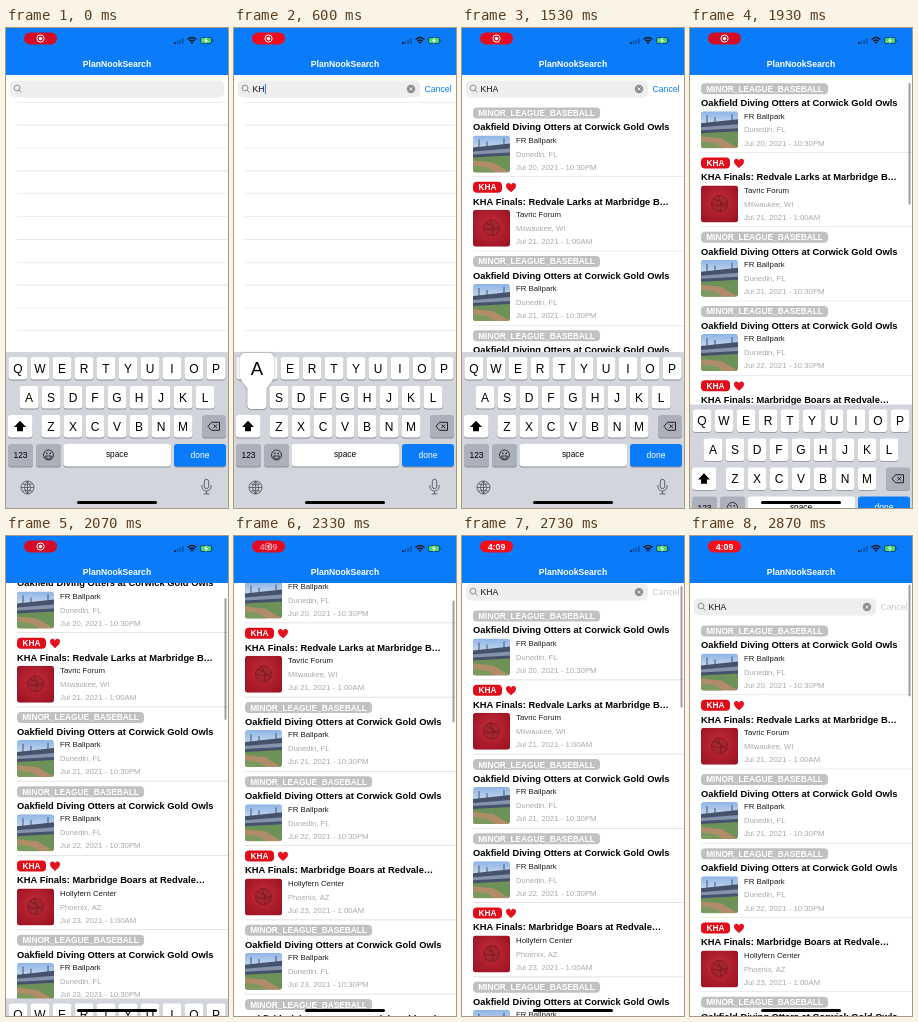
These frames come from a looping animation (222x480 px, 2.94 s). An HTML page with a canvas:

```html
<!DOCTYPE html>
<html lang="en">
<head>
<meta charset="utf-8">
<title>Event search</title>
<style>
html, body { margin: 0; width: 222px; height: 480px; overflow: hidden; background: #fff; }
canvas { display: block; width: 222px; height: 480px; }
</style>
</head>
<body>
<canvas id="stage"></canvas>
<script>
const W = 222, H = 480, LOOP = 2940, ROW = 74.25, TABLE_TOP = 74.5;
const BLUE = '#0a7cfa', GRAY = '#8e8e93', INK = '#16161a';
const FONT = '"Liberation Sans", Arial, sans-serif';

const canvas = document.getElementById('stage');
const dpr = window.devicePixelRatio || 1;
canvas.width = W * dpr;
canvas.height = H * dpr;
const c = canvas.getContext('2d');

const presses = [['K', 70, 220], ['H', 300, 440], ['A', 540, 680]];
const RESULTS_AT = 930, IMAGES_AT = 1200, DRAG_AT = 1800;
const scrollKeys = [[1780, 0], [1870, 8], [1930, 24], [2000, 42], [2070, 52], [2200, 63],
  [2330, 62], [2465, 46], [2600, 26], [2730, 5], [2870, -10], [2940, -10]];

const baseball = day => ({
  tag: 'MINOR_LEAGUE_BASEBALL', title: 'Oakfield Diving Otters at Corwick Gold Owls',
  venue: 'FR Ballpark', city: 'Dunedin, FL', date: `Jul ${day}, 2021 - 10:30PM`
});
const finals = (title, venue, city, day) => ({
  tag: 'KHA', liked: true, title, venue, city, date: `Jul ${day}, 2021 - 1:00AM`
});
const events = [
  baseball(20),
  finals('KHA Finals: Redvale Larks at Marbridge B…', 'Tavric Forum', 'Milwaukee, WI', 21),
  baseball(21),
  baseball(22),
  finals('KHA Finals: Marbridge Boars at Redvale…', 'Hollyfern Center', 'Phoenix, AZ', 23),
  baseball(23),
  baseball(24)
];

const clamp = v => Math.max(0, Math.min(1, v));
const span = (t, a, b) => clamp((t - a) / (b - a));

function track(keys, t) {
  if (t <= keys[0][0]) return keys[0][1];
  const i = keys.findIndex(k => k[0] >= t);
  if (i < 0) return keys[keys.length - 1][1];
  const [t0, v0] = keys[i - 1], [t1, v1] = keys[i];
  return v0 + (v1 - v0) * (t - t0) / (t1 - t0);
}

// Text is centred vertically on y by its cap height.
function text(s, x, y, size, color, weight = 'normal', align = 'left') {
  c.font = `${weight} ${size}px ${FONT}`;
  c.fillStyle = color;
  c.textAlign = align;
  c.fillText(s, x, y + size * 0.36);
}

function rect(x, y, w, h, color, r = 0) {
  c.fillStyle = color;
  c.beginPath();
  c.roundRect(x, y, w, h, r);
  c.fill();
}

function disc(x, y, r, color) {
  c.fillStyle = color;
  c.beginPath();
  c.arc(x, y, r, 0, 7);
  c.fill();
}

function shape(d, color, x = 0, y = 0) {
  c.save();
  c.translate(x, y);
  c.fillStyle = color;
  c.fill(new Path2D(d));
  c.restore();
}

function line(d, color, width = 1, x = 0, y = 0) {
  c.save();
  c.translate(x, y);
  c.strokeStyle = color;
  c.lineWidth = width;
  c.stroke(new Path2D(d));
  c.restore();
}

const ring = r => `M${r} 0A${r} ${r} 0 1 1 ${-r} 0A${r} ${r} 0 1 1 ${r} 0`;

function clipped(x, y, w, h, r, draw) {
  c.save();
  c.beginPath();
  c.roundRect(x, y, w, h, r);
  c.clip();
  c.translate(x, y);
  draw();
  c.restore();
}

function ballpark() {
  const sky = c.createLinearGradient(0, 0, 0, 18);
  sky.addColorStop(0, '#8db4e6');
  sky.addColorStop(1, '#dbe6f1');
  rect(0, 0, 37, 37, sky);
  shape('M0 12L37 8V24H0Z', '#46526b');
  shape('M0 16L37 13V17L0 19Z', '#8493ab');
  line('M6 4V13M14 6V12M31 3V10', '#46526b', 1);
  shape('M0 22L37 20V37H0Z', '#6d9257');
  shape('M0 25L20 27L37 37H0Z', '#b08c69');
  shape('M0 30L14 32L22 37H0Z', '#7c9a60');
}

function redBall() {
  const g = c.createRadialGradient(18, 15, 3, 18, 18, 27);
  g.addColorStop(0, '#c02a38');
  g.addColorStop(1, '#98101f');
  rect(0, 0, 37, 37, g);
  disc(18.5, 18, 8, '#a42631');
  line(ring(8) + 'M-8 0Q0 4 8 -1M-2 -8Q3 0 1 8M-6 -5Q1 -3 7 4', '#75131e', 0.7, 18.5, 18);
}

function drawRow(e, top, loaded) {
  const mid = top + 10.5;
  rect(11, mid - 5.5, e.liked ? 29 : 127, 11, e.liked ? '#e20b18' : '#c1c1c4', 4);
  text(e.tag, e.liked ? 25.5 : 74.5, mid, 8.3, '#fff', 'bold', 'center');
  if (e.liked)
    shape('M0 5C-3 2.5 -5 .8 -5 -1.6C-5 -5 -1 -5.2 0 -2.4C1 -5.2 5 -5 5 -1.6C5 .8 3 2.5 0 5Z', '#e3121e', 49, mid);
  text(e.title, 11, mid + 14, 9.33, '#000', 'bold');
  clipped(11, mid + 22.5, 37, 37, 3, () => {
    if (!loaded) rect(0, 0, 37, 37, '#e9e9eb');
    else if (e.liked) redBall();
    else ballpark();
  });
  text(e.venue, 54, mid + 27, 7.8, '#1c1c1e');
  text(e.city, 54, mid + 41, 7.6, '#a9a9ad');
  text(e.date, 54, mid + 54, 7.8, '#a9a9ad');
  rect(11, top + ROW - 0.3, W - 11, 0.6, '#dcdcdf');
}

function drawSearch(t, query) {
  const open = 1 - (1 - span(t, 70, 280)) ** 2;
  const right = 218 - 32 * open;
  rect(4, 52.5, right - 4, 17, '#eeeeef', 5);
  line(ring(2.9) + 'M2.1 2.1L4.6 4.6', GRAY, 1, 11, 60);
  text(query, 18.5, 61, 8.6, '#111');
  const caretOn = t >= 70 && t < 1200 || t >= 1680 && t < DRAG_AT;
  if (caretOn) rect(19 + c.measureText(query).width, 56, 1, 10, '#3478f6');
  if (query) {
    disc(right - 9, 61, 4.2, GRAY);
    line('M-1.5 -1.5L1.5 1.5M1.5 -1.5L-1.5 1.5', '#fff', 0.8, right - 9, 61);
  }
  text('Cancel', 190.5 + 34 * (1 - open), 60.5, 8.7, t < DRAG_AT + 50 ? BLUE : '#c8c8cc');
}

function drawTable(t, scroll, query) {
  c.save();
  c.translate(0, -scroll);
  drawSearch(t, query);
  if (t < RESULTS_AT) {
    for (let i = 0; i < 12; i++) rect(11, 74 + 22.85 * i, W - 11, 0.6, '#dedee1');
  } else {
    events.forEach((e, i) => drawRow(e, TABLE_TOP + ROW * i, t >= IMAGES_AT));
  }
  c.restore();
  if (t >= DRAG_AT)
    rect(218.5, 48.5 + Math.max(0, scroll) * 0.26, 2, 122 + Math.min(0, scroll), 'rgba(0,0,0,.38)', 1);
}

function drawBars(t) {
  rect(0, 0, W, 47, BLUE);
  text('PlanNookSearch', 111, 36, 8.6, '#fff', 'bold', 'center');

  const glow = 0.5 - 0.5 * Math.cos(t / 1960 * Math.PI * 2);
  rect(18, 4.5, 33, 12, `rgb(${212 + 40 * glow}, 12, ${38 - 14 * glow})`, 6);
  const clock = span(t, 2260, 2400);
  c.globalAlpha = 1 - clock;
  line(ring(3.6), '#fff', 1, 34.5, 10.5);
  disc(34.5, 10.5, 1.7, '#fff');
  c.globalAlpha = clock;
  text('4:09', 34.5, 10.7, 8.8, '#fff', 'bold', 'center');
  c.globalAlpha = 1;

  for (let i = 0; i < 4; i++)
    rect(168 + i * 2.7, 14 - i * 1.3, 1.8, 2 + i * 1.3, i ? 'rgba(0,20,60,.35)' : INK, 0.4);
  line('M-4.4 -4Q0 -8 4.4 -4M-2.7 -2.2Q0 -4.5 2.7 -2.2', INK, 1.4, 186, 15.5);
  shape('M0 0L-1.5 -1.7Q0 -2.8 1.5 -1.7Z', INK, 186, 16);
  rect(194, 9, 12, 7, 'rgba(0,20,60,.5)', 2);
  rect(195, 10, 10, 5, '#41dc62', 1.2);
  rect(206.5, 11.2, 1, 2.6, 'rgba(0,20,60,.5)', 0.5);
  shape('M.8 -3.4L-2.2 .5H-.2L-.8 3.4L2.2 -.5H.2Z', '#fff', 200, 12.5);
}

function key(x, y, w, color = '#fff') {
  rect(x, y + 0.9, w, 22.5, '#8b8d92', 3);
  rect(x, y, w, 22.5, color, 3);
}

const rows = [['QWERTYUIOP', 12, 329], ['ASDFGHJKL', 23, 358], ['ZXCVBNM', 45, 387]];

function drawPopup(letter) {
  const [keys, x0, y] = rows.find(r => r[0].includes(letter));
  const x = x0 + 22 * keys.indexOf(letter);
  c.save();
  c.translate(x, y);
  c.shadowColor = 'rgba(0,0,0,.3)';
  c.shadowBlur = 3 * dpr;
  c.fillStyle = '#fff';
  c.beginPath();
  c.roundRect(-17, -33, 34, 28, 5);
  c.moveTo(-16.5, -8);
  c.lineTo(16.5, -8);
  c.quadraticCurveTo(15, -4, 9.5, 2);
  c.lineTo(-9.5, 2);
  c.quadraticCurveTo(-15, -4, -16.5, -8);
  c.roundRect(-9.5, -2, 19, 25, 4);
  c.fill();
  c.restore();
  text(letter, x, y - 17.5, 18.5, '#000', 'normal', 'center');
}

function drawKeyboard(t) {
  const drop = 156 * (1 - (1 - span(t, 1870, 2140)) ** 1.6);
  if (drop >= 156) return;
  const dark = '#abb0ba', icon = '#50545b';
  c.save();
  c.translate(0, drop);
  rect(0, 324, W, 156, '#d2d5db');
  for (const [keys, x0, y] of rows)
    [...keys].forEach((k, i) => {
      key(x0 + 22 * i - 9.5, y, 19);
      text(k, x0 + 22 * i, y + 11.3, 12, '#000', 'normal', 'center');
    });

  key(2, 387, 24.5);
  shape('M0 -5.5L6 .8H3V5H-3V.8H-6Z', '#000', 14, 398.3);
  key(196, 387, 24, dark);
  line('M-6 0L-2.5 -4H5.5V4H-2.5ZM-.5 -1.8L3.1 1.8M3.1 -1.8L-.5 1.8', '#111', 0.9, 208, 398.3);

  key(2, 416, 25, dark);
  text('123', 14.5, 427, 8.5, '#000', 'normal', 'center');
  key(30, 416, 25, dark);
  line(ring(5) + 'M-3 1A3 3 0 0 0 3 1Z', '#222', 0.9, 42.5, 427);
  disc(40.8, 425.4, 0.8, '#222');
  disc(44.2, 425.4, 0.8, '#222');
  key(57.5, 416, 107.5);
  text('space', 111, 426.5, 8.3, '#000', 'normal', 'center');
  key(168, 416, 52, BLUE);
  text('done', 194, 426.5, 8.5, '#fff', 'normal', 'center');

  line(ring(6.5) + 'M-6.5 0H6.5M0 -6.5V6.5M0 -6.5Q-6 0 0 6.5M0 -6.5Q6 0 0 6.5M-5 -3.6Q0 -1.8 5 -3.6M-5 3.6Q0 1.8 5 3.6',
    icon, 0.8, 21.5, 459.5);
  line('M-2.2 -5A2.2 2.2 0 0 1 2.2 -5V0A2.2 2.2 0 0 1 -2.2 0ZM-4.6 -1.5V0A4.6 4.6 0 0 0 4.6 0V-1.5M0 4.6V7.4M-2.8 7.4H2.8',
    icon, 0.9, 200.5, 458.5);

  const down = presses.find(p => t >= p[1] && t < p[2]);
  if (down) drawPopup(down[0]);
  c.restore();
}

function draw() {
  const t = performance.now() % LOOP;
  const query = presses.filter(p => t >= p[2]).map(p => p[0]).join('');
  c.setTransform(dpr, 0, 0, dpr, 0, 0);
  rect(0, 0, W, H, '#fff');
  drawTable(t, track(scrollKeys, t), query);
  drawBars(t);
  drawKeyboard(t);
  rect(71, 473, 80, 3, '#000', 1.5);
  requestAnimationFrame(draw);
}
draw();
</script>
</body>
</html>
```
